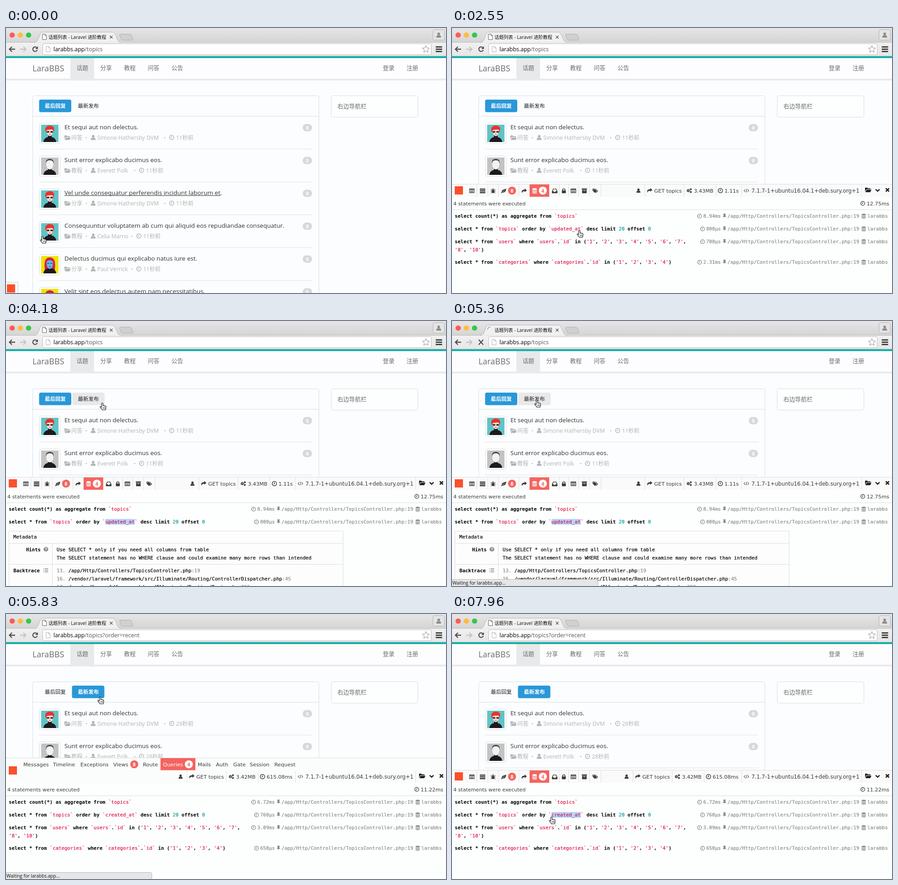
Animation, 964 px wide and 581 px high, one loop 8 s. Source, as an HTML page:

```html
<!DOCTYPE html>
<html lang="zh-CN">
<head>
<meta charset="utf-8">
<title>话题列表</title>
<style>
html, body { margin: 0; width: 100%; height: 100%; overflow: hidden; background: #fcfdfe; }
#stage { display: block; width: 964px; height: 581px; cursor: default; }
text { white-space: pre; font-family: 'Open Sans', 'Noto Sans CJK SC', 'Noto Sans CJK JP', 'Noto Sans CJK', sans-serif; }
.title { font-size: 13.5px; fill: #333; }
.meta { font-size: 12.2px; fill: #b4b4b4; }
.nav { font-size: 12.8px; fill: #6c6c6c; }
.brand { font-size: 18px; fill: #6c6c6c; }
.pill { font-size: 11.5px; fill: #222; }
.on { fill: #fff; font-weight: 700; }
.tab { font-size: 10.2px; fill: #111; }
.url { font-size: 12.45px; fill: #000; }
.path { fill: #555; }
.status { font-size: 10px; fill: #111; }
.bar { font: 11.35px 'DejaVu Sans', 'Noto Sans', sans-serif; fill: #3a3a3a; }
.wide { font-size: 11.7px; }
.note { font: 11.07px 'DejaVu Sans', 'Noto Sans', sans-serif; fill: #3a3a3a; }
.code { font: 10.67px 'DejaVu Sans Mono', 'Liberation Mono', monospace; fill: #000; stroke: #000; stroke-width: .2px; }
.sql { font-weight: 700; stroke: none; }
.str { font-weight: 400; fill: #d14; stroke: #d14; }
.num { font-weight: 400; fill: #099; stroke: #099; }
.dim { fill: #888; stroke: #888; }
.end { text-anchor: end; }
.badge { font: 700 11px 'Open Sans', sans-serif; text-anchor: middle; }
</style>
</head>
<body>
<svg id="stage" viewBox="0 0 964 581" xmlns="http://www.w3.org/2000/svg"></svg>
<script>
const LOOP = 8000, CHAR = 6.42, BORDER = '#d3e0e9', RED = '#f4645f', LOGO = '#f9502d';

// Helpers that return SVG markup
const text = (x, y, s, cls) => `<text x="${x}" y="${y}" class="${cls}">${s}</text>`;
const rect = (x, y, w, h, fill, rest = '') => `<rect x="${x}" y="${y}" width="${w}" height="${h}" fill="${fill}" ${rest}/>`;
const box = (x, y, w, h, fill, stroke, r = 0) => rect(x + .5, y + .5, w, h, fill, `stroke="${stroke}" rx="${r}"`);
const path = (d, fill = 'none', stroke = 'none', w = 1) => `<path d="${d}" fill="${fill}" stroke="${stroke}" stroke-width="${w}"/>`;
const dot = (x, y, r, fill) => `<circle cx="${x}" cy="${y}" r="${r}" fill="${fill}"/>`;
const group = (name, body) => `<g class="${name}">${body}</g>`;
const icon = (id, cx, cy, size = 12, color = '#3a3a3a') =>
  `<use href="#${id}" x="${cx - size / 2}" y="${cy - size / 2}" width="${size}" height="${size}" color="${color}"/>`;

// Icons on a 14 by 14 grid
const C = 'currentColor';
const line = (d, w = 1.6) => path(d, 'none', C, w);
const solid = d => `<path d="${d}" fill="${C}" fill-rule="evenodd"/>`;
const gear = (x, y, r) => `<circle cx="${x}" cy="${y}" r="${r}" fill="none" stroke="${C}" stroke-width="2"/>` +
  `<circle cx="${x}" cy="${y}" r="${r + 1.3}" fill="none" stroke="${C}" stroke-width="1.3" stroke-dasharray="1.4 1.6"/>`;
const icons = {
  folder: solid('M0 2h5l1 1.5h6V5.6H3L0 10.5z M3.5 6.4H14L11.4 12H.5z'),
  user: solid('M7 .5a3.4 3.6 0 1 1 0 7.2 3.4 3.6 0 1 1 0-7.2z M.8 13.5c0-4.5 2-6 3.6-6 1.6 1 3.6 1 5.2 0 1.6 0 3.6 1.5 3.6 6z'),
  clock: `<circle cx="7" cy="7" r="5.6" fill="none" stroke="${C}" stroke-width="1.7"/>` + line('M7.2 3.5V7.5H4.5', 1.3),
  list: line('M.8 2.3h12.4v9.6H.8z', 1.4) + solid('M.8 2h12.4v2.4H.8z') + line('M2.5 6.4h9M2.5 8.4h9M2.5 10.3h9', 1),
  tasks: solid('M0 1.2h14v3H0z M0 5.6h14v3H0z M0 10h14v3H0z'),
  bug: solid('M7 1.2c2 0 2.6 1.4 2.6 2.6H4.4C4.4 2.6 5 1.2 7 1.2z M3.8 4.8h6.4v4.2c0 5.2-6.4 5.2-6.4 0z') +
    line('M1 3l3 2.5M13 3l-3 2.5M.5 8h3.5M13.5 8H10M1.5 13l3-3M12.5 13l-3-3', 1.2),
  leaf: solid('M13.5 1C13.5 9 10 12 5 11L1.5 13.2.5 12 2.5 9.8C1.5 3.5 9 4.5 13.5 1z') + path('M4 9.5C6 7.5 8 7 10 6.5', 'none', '#fff', .9),
  share: solid('M8.5 1L14 5.8 8.5 10.5V7.8C4 7.6 2 9 2.3 13-1 8 1 4 8.5 4z'),
  db: solid('M1 2.5c0-2.8 12-2.8 12 0v1c0 1.8-12 1.8-12 0z M1 5.3c2 1.3 10 1.3 12 0v1.4c0 1.8-12 1.8-12 0z M1 8.3c2 1.3 10 1.3 12 0v1.4c0 1.8-12 1.8-12 0z M1 11.2c2 1.3 10 1.3 12 0v.8c0 2.4-12 2.4-12 0z'),
  inbox: solid('M3 1.5h8L14 8v5H0V8z M4 3L2 8h2.5l1 2h3l1-2H12L10 3z'),
  lock: solid('M2 6h1V4.5c0-5 8-5 8 0V6h1v7H2z M5 6h4V4.5c0-2.5-4-2.5-4 0z'),
  archive: solid('M.5 1h13v3.2H.5z M1.2 5h11.6v8H1.2z M5 6.3h4v1.2H5z'),
  tags: solid('M0 1.5h5L11 7.5 6.3 12.5 0 6.5z M2.5 3a1 1 0 1 0 .1 0z M6.5 1.5h1.5L14 7.5 9.3 12.5 8.5 11.7 12 7.5z'),
  cogs: gear(4.8, 7, 2.3) + gear(11.4, 3.6, 1) + gear(11.4, 10.6, 1),
  code: line('M4 3.5L1 7l3 3.5M10 3.5L13 7l-3 3.5M8 2.5L6 11.5', 1.2),
  pin: solid('M3.5 0h7v1.5h-1v4L12 9H7.7L7 14 6.3 9H2L4.5 5.5v-4h-1z'),
  down: line('M1.5 4.5L7 9.8 12.5 4.5', 3.2),
  close: line('M2 2L12 12M12 2L2 12', 3.8),
  ul: line('M0 2.5h2M4 2.5h10M0 7h2M4 7h10M0 11.5h2M4 11.5h10', 1.7),
  help: dot(7, 7, 6.5, C) + path('M4.9 5.5c0-2.7 4.4-2.5 4.2 0C9 6.8 7 6.8 7 8.6M7 9.8v1.6', 'none', '#fff', 1.6),
  page: path('M2.5.5h6l3.5 3.5v9.5h-9.5z M8.5.5V4H12', '#fff', C)
};
const defs = '<defs>' + Object.entries(icons).map(([id, d]) => `<symbol id="${id}" viewBox="0 0 14 14">${d}</symbol>`).join('') +
  `<linearGradient id="strip" x2="0" y2="1"><stop stop-color="#e6e6e6"/><stop offset="1" stop-color="#d4d4d4"/></linearGradient>
  <linearGradient id="tool" x2="0" y2="1"><stop stop-color="#f1f1f1"/><stop offset="1" stop-color="#e6e6e6"/></linearGradient></defs>`;

// Browser window
function browser() {
  const lights = ['#fc5b57', '#fdbc40', '#34c84a'].map((c, i) => dot(13.5 + 18 * i, 15.5, 5.8, c)).join('');
  return rect(0, 0, 964, 32, 'url(#strip)') + rect(0, 31, 964, 31, 'url(#tool)') + rect(0, 31, 964, 1, '#bcbcbc') + rect(0, 61, 964, 1, '#b8bcbc') + lights +
    path('M62 32C68 31 70 27 73 18 76 10 77 9 81 9H232C236 9 238 11 241 18 245 28 246 31 252 32z', '#f1f1f1', '#b4b4b4') +
    rect(64, 31.5, 187, 1.5, '#f0f0f0') +
    path('M250 13.5H271Q274 13.5 275 16L278 24Q278.5 26.5 276 26.5H256Q253 26.5 252 24L249 16Q248.5 13.5 250 13.5z', '#d0d0d0', '#b0b0b0') +
    group('idle', icon('page', 84, 19.5, 13, '#555')) +
    group('busy', '<path id="spin" d="M78 19A6 6 0 0 1 84 13" fill="none" stroke="#9a9a9a" stroke-width="1.6"/>') +
    text(93, 23.5, '话题列表 - Laravel 进阶教程', 'tab') + path('M227.5 17l6 6m0-6l-6 6', 'none', '#555', 1.3) +
    box(935, 3, 25, 23, '#e4e4e4', '#b4b4b4', 3) + icon('user', 948, 15.5, 12, '#8a8a8a') +
    path('M20 46.5H8M13 41L7.5 46.5 13 52', 'none', '#505050', 2.4) +
    path('M31 46.5H43M38 41L43.5 46.5 38 52', 'none', '#c4c4c4', 2.4) +
    group('idle', path('M67.5 43A5 5 0 1 0 68.5 48', 'none', '#505050', 2.2) + path('M70 40v6h-6z', '#505050')) +
    group('busy', path('M58.5 41l10 11m0-11l-10 11', 'none', '#505050', 2.4)) +
    box(80, 34, 851, 24, '#fff', '#bdbdbd', 2) + icon('page', 92, 46.5, 13, '#aaa') +
    text(104, 51, 'larabbs.app<tspan class="path">/topics<tspan class="new">?order=recent</tspan></tspan>', 'url') +
    path('M920 38.5l2.2 5.2 5.6.5-4.3 3.7 1.3 5.5-4.8-2.9-4.8 2.9 1.3-5.5-4.3-3.7 5.6-.5z', '#fff', '#8c8c8c') +
    path('M941.5 41.5h14M941.5 46.5h14M941.5 51.5h14', 'none', '#444', 2.8);
}

// Avatars: 38 by 38
const body = path('M5 38C6 31 9 29 15 27V22H23V27C29 29 32 31 33 38z', '#1b1a1e');
const faces = {
  teal: rect(0, 0, 38, 38, '#62c3c6') + body + path('M12 11C12 20 15 25 19 25S26 20 26 11z', '#f7ddd3') +
    path('M11 17C6 9 11 2 19 2S31 7 27 17C27 13 26 11 23 10 18 11 14 11 12 12z', '#ee3129') +
    rect(12, 14, 6, 3.5, '#4a2a34', 'rx="1.5"') + rect(20, 14, 6, 3.5, '#4a2a34', 'rx="1.5"') + rect(17.5, 20.5, 3, 1.4, '#d8232c', 'rx=".7"'),
  grey: rect(0, 0, 38, 38, '#c3c3c3') + body + path('M11 11C11 20 14 26 19 26S27 20 27 11C26 3 12 3 11 11z', '#f3f3f3') +
    path('M11 14C9 6 14 3 19 3S29 6 27 14C27 9 25 6 19 6S11 9 11 14z', '#444'),
  gold: rect(0, 0, 38, 38, '#f1e200') + path('M8 30C6 12 9 3 19 3S32 12 30 30z', '#d51f4b') + body +
    path('M12 13C12 25 15 28 19 28S26 25 26 13C23 8 15 8 12 13z', '#62b8ea') +
    rect(13.5, 15, 4, 1.6, '#243a78') + rect(20.5, 15, 4, 1.6, '#243a78') + rect(17, 22.5, 4, 1.6, '#d51f4b')
};

// Forum page
const topics = [
  ['Et sequi aut non delectus.', '问答', 'Simone Hathersby DVM', 339, 'teal'],
  ['Sunt error explicabo ducimus eos.', '教程', 'Everett Polk', 273, 'grey'],
  ['Vel unde consequatur perferendis incidunt laborum et.', '分享', 'Simone Hathersby DVM', 339, 'teal'],
  ['Consequuntur voluptatem ab cum qui aliquid eos repudiandae consequatur.', '教程', 'Celia Marno', 267, 'teal'],
  ['Delectus ducimus qui explicabo natus iure est.', '分享', 'Paul Verrick', 267, 'gold'],
  ['Velit sint eos delectus autem nam necessitatibus.', '分享', 'Paul Verrick', 267, 'gold']
];
function topic([title, kind, name, end, face], i) {
  const y = 72 * i;
  return box(73, y + 208, 45, 45, '#fff', '#ddd', 4) + `<g transform="translate(77 ${y + 212})">${faces[face]}</g>` +
    text(128, y + 222, title, 'title') + (i == 2 ? group('under', rect(128, y + 223, 342, 1, '#333')) : '') +
    icon('folder', 135, y + 240.5, 14, '#b4b4b4') + text(143, y + 245, kind, 'meta') + dot(176, y + 240.5, 1.2, '#b4b4b4') +
    icon('user', 191, y + 240, 12, '#b4b4b4') + text(200, y + 245, name, 'meta') + dot(end + 9, y + 240.5, 1.2, '#b4b4b4') +
    icon('clock', end + 24, y + 240, 12, '#b4b4b4') +
    group('old', text(end + 33.5, y + 245, '11秒前', 'meta')) + group('new', text(end + 33.5, y + 245, '28秒前', 'meta')) +
    rect(650, y + 210.5, 20.5, 16, '#d8d8d8', 'rx="8"') + `<text x="660.2" y="${y + 222.6}" class="badge" fill="#fff">0</text>` +
    rect(72, y + 265, 599, 1, '#dfe1e3');
}
function forum() {
  const nav = [['话题', 154.5], ['分享', 206.5], ['教程', 258.5], ['问答', 310.5], ['公告', 362.5], ['登录', 825.5], ['注册', 877.5]];
  const tabs = (a, b) => text(85, 174.8, '最后回复', 'pill ' + a) + text(157.5, 174.8, '最新发布', 'pill ' + b);
  return rect(0, 62, 964, 519, '#fcfdfe') + rect(0, 110, 964, 5, '#e9eaeb') + rect(0, 66, 964, 45, '#fdfdff') + rect(0, 62, 964, 4, '#13b1ab') +
    rect(141, 66, 52, 45, '#e8e9ea') + text(58, 94.5, 'LaraBBS', 'brand') + nav.map(([s, x]) => text(x, 92.3, s, 'nav')).join('') +
    box(58, 148, 627, 500, 'none', BORDER, 4) + rect(59, 193, 626, 1, BORDER) +
    box(712, 148, 190, 47, '#fdfefe', BORDER, 4) + text(726, 176, '右边导航栏', 'nav') +
    group('hover', rect(145, 157, 71, 27.5, '#e9e9e9', 'rx="4"')) +
    group('old', rect(72.5, 157, 70.5, 27.5, '#2898d8', 'rx="4"') + tabs('on', '')) +
    group('new', rect(144.5, 157, 71, 27.5, '#2898d8', 'rx="4"') + tabs('', 'on')) +
    topics.map(topic).join('') +
    group('mini', box(-2, 557, 28, 30, '#fbfbfb', '#ccc') + rect(2, 562, 18, 18, LOGO));
}

// Debug bar
const count = (x, y, n, fill, color) => dot(x, y, 8.8, fill) + `<text x="${x}" y="${y + 4}" class="badge" fill="${color}">${n}</text>`;
const rules = xs => xs.map(x => rect(x, 343, 1, 27, '#e0e0e0')).join('');
function sql(y, s) {
  const html = s.replace(/`[^`]*`|'[^']*'|\b\d+\b/g, m => `<tspan class="${/\d/.test(m[0]) ? 'num' : 'str'}">${m}</tspan>`);
  return text(6, y, html, 'code sql');
}
const origin = (y, time) => icon('clock', 589 - time.length * CHAR - 8, y - 3.5, 11, '#888') + text(589, y, time, 'code dim end') +
  icon('pin', 597, y - 3.5, 11, '#888') + text(603.5, y, '/app/Http/Controllers/TopicsController.php:19', 'code dim') +
  icon('db', 902, y - 3.5, 11, '#888') + text(910, y, 'larabbs', 'code dim');
function info(shift, memory, time, total, spans) {
  const x = s => s + shift;
  return icon('user', x(408.5), 356.5, 10) + rules([x(422), x(508), shift ? 552 : 578]) +
    icon('share', x(433), 356, 12) + text(x(443), 360.5, 'GET topics', 'bar') +
    icon('cogs', x(519.5), 356.5, 12) + text(x(530), 360.5, memory, 'bar') +
    icon('clock', shift ? 562 : 588, 356.5, 12) + text(shift ? 571 : 597, 360.5, time, 'bar') +
    text(958, 388.5, total, 'bar end') + icon('clock', 900, 384.5, 11) +
    origin(416, spans[0]) + origin(444, spans[1]) + group('rest', origin(472, spans[2]) + origin(517, spans[3]));
}
function strip() {
  const tools = [['list', 43.5], ['tasks', 67], ['bug', 90], ['leaf', 113], ['share', 158], ['inbox', 225], ['lock', 245], ['list', 266], ['archive', 290], ['tags', 314]];
  return rect(0, 342, 964, 28, '#fafafa') + rect(0, 342, 964, 1, '#ddd') + rect(6, 347, 18, 18, LOGO) +
    rules([54, 78, 101, 146, 235, 255, 277, 301, 326]) + tools.map(([id, x]) => icon(id, x, 357, 12)).join('') +
    count(131.5, 356.5, 8, RED, '#fff') + rect(170, 343, 43, 27, RED) + icon('db', 181, 357, 12, '#fff') + count(199, 356.5, 4, '#fff', RED);
}
function labels() {
  const names = [['Messages', 38], ['Timeline', 103], ['Exceptions', 163], ['Views', 235], ['Route', 300], ['Mails', 420], ['Auth', 460], ['Gate', 498], ['Session', 534], ['Request', 588]];
  return rect(0, 315, 964, 55, '#fbfcfc') + rect(0, 315, 964, 1, '#ddd') + rect(6, 334, 18, 18, LOGO) +
    names.map(([s, x]) => text(x, 333.5, s, 'bar')).join('') + count(281, 329.5, 8, RED, '#fff') +
    rect(338.5, 316, 76.5, 26.5, RED) + `<text x="344" y="333.5" class="bar" style="fill:#fff">Queries</text>` + count(400.5, 329.5, 4, '#fff', RED);
}
function metadata() {
  const trace = [['13', '/app/Http/Controllers/TopicsController.php', 19], ['16', '/vendor/laravel/framework/src/Illuminate/Routing/ControllerDispatcher.php', 45], ['17', '/vendor/laravel/framework/src/Illuminate/Routing/Route.php', 212]];
  return box(6, 460, 732, 200, '#fdfdfd', '#ddd') + rect(7, 487, 731, 1, '#ddd') + rect(7, 533, 731, 1, '#ddd') + rect(101, 487, 1, 100, '#ddd') +
    text(16, 476.5, 'Metadata', 'code') + text(76, 504.5, 'Hints', 'code sql end') + icon('help', 87.5, 500.5, 11, '#888') +
    text(111, 504.5, 'Use SELECT * only if you need all columns from table', 'code') +
    text(111, 522.5, 'The SELECT statement has no WHERE clause and could examine many more rows than intended', 'code') +
    text(74, 550.5, 'Backtrace', 'code sql end') + icon('ul', 87, 546.5, 11, '#888') +
    trace.map(([n, file, at], i) => text(111, 550.5 + 18 * i, `<tspan class="dim">${n}. </tspan>${file}<tspan class="dim">:${at}</tspan>`, 'code')).join('');
}
function debugBar() {
  const order = col => sql(443.5, `select * from \`topics\` order by \`${col}\` desc limit 20 offset 0`);
  return rect(0, 370, 964, 211, '#fdfefe') + group('strip', strip()) + group('labels', labels()) +
    rules([634, 897]) + icon('code', 645, 356.5, 12) + text(656, 360.5, '7.1.7-1+ubuntu16.04.1+deb.sury.org+1', 'bar wide') +
    icon('folder', 912, 355, 14, '#222') + icon('down', 932.5, 355.5, 11, '#222') + icon('close', 954, 355, 10, '#222') +
    text(3, 388.5, '4 statements were executed', 'note') + rect(0, 398, 964, 1, '#ddd') +
    '<rect id="sel" y="434" height="12.5" fill="#b4d5fe"/>' + sql(415.5, 'select count(*) as aggregate from `topics`') +
    group('old', order('updated_at')) + group('new', order('created_at')) +
    group('rest', sql(471.5, "select * from `users` where `users`.`id` in ('1', '2', '3', '4', '5', '6', '7',") + sql(489.5, "'8', '10')") +
      sql(516.5, "select * from `categories` where `categories`.`id` in ('1', '2', '3', '4')")) +
    group('old', info(0, '3.43MB', '1.11s', '12.75ms', ['8.94ms', '800µs', '700µs', '2.31ms'])) +
    group('new', info(-26, '3.42MB', '615.08ms', '11.22ms', ['6.72ms', '760µs', '3.09ms', '650µs'])) +
    group('detail', metadata());
}

const hand = path('M4 10V2.2a1.5 1.5 0 0 1 3 0V7c.5-1 2.2-.9 2.5.2.6-.8 2-.6 2.3.4.7-.5 1.7-.1 1.7.9V11c0 2-1 3-1 5H5.5C4.5 13.5 1.5 11.5.7 9.6c-.4-1.2 1-1.8 1.9-.9z', '#fff', '#111', 1.1) +
  path('M7.2 10v3.5M9.2 10v3.5M11.2 10v3.5', 'none', '#111', .8);
const pointer = '<g id="pointer">' +
  group('arrow', path('M0 0V12.5L3 9.8 5 14.3 7 13.4 5 9H9z', '#111', '#fff', .8)) +
  group('hand', `<g transform="translate(-5.5 -1)">${hand}</g>`) + '</g>';
const stage = document.getElementById('stage');
stage.innerHTML = defs + forum() + group('debug', debugBar()) +
  group('status', path('M-1 566.5H316Q319.5 566.5 319.5 570V582H-1z', '#e6e6e6', '#b8b8b8') + text(1, 577.5, 'Waiting for larabbs.app...', 'status')) +
  browser() + pointer;

// Pointer legs: start, end, steps, x, y; each leg begins where the last one stopped
const legs = [
  [150, 630, 4, 9, 567], [1220, 1960, 6, 207, 430], [2100, 2550, 4, 279, 444], [2850, 3730, 7, 219, 444],
  [4180, 4180, 1, 211, 180], [4330, 4470, 2, 186, 174], [5650, 5830, 2, 206, 182],
  [5990, 6470, 4, 283, 444], [6920, 7510, 5, 222, 444], [7810, 7960, 2, 218, 445]
];
function pointerAt(t) {
  let x = 80, y = 457;
  for (const [from, to, n, ex, ey] of legs) {
    if (t < from) break;
    const gap = n > 1 ? (to - from) / (n - 1) : 1;
    const p = Math.min(1, (Math.floor((t - from) / gap + .001) + 1) / n);
    x += (ex - x) * p;
    y += (ey - y) * p;
  }
  return [x, y];
}

const parts = {};
for (const name of ['old', 'new', 'rest', 'detail', 'strip', 'labels', 'debug', 'status', 'idle', 'busy', 'mini', 'under', 'hover', 'arrow', 'hand'])
  parts[name] = stage.querySelectorAll('.' + name);
const show = (name, on) => parts[name].forEach(e => { e.style.display = on ? '' : 'none'; });
const byId = id => document.getElementById(id);
const sel = byId('sel'), spin = byId('spin'), cursor = byId('pointer');

function draw(t) {
  const between = (a, b) => t >= a && t < b;
  const open = t >= 930, fresh = t >= 5650, busy = between(4770, 5830);
  const wide = between(5650, 5990), detail = between(4030, 5650);
  const [x, y] = pointerAt(t);
  const onTabs = y > 157 && y < 187 && x > 73 && x < 216;
  const hot = onTabs || (open ? y > 400 && y < 525 : (x < 27 && y > 557) || (x > 73 && y < 470));
  show('old', !fresh); show('new', fresh);
  show('debug', open); show('mini', !open);
  show('labels', wide); show('strip', !wide);
  show('detail', detail); show('rest', !detail);
  show('busy', busy); show('idle', !busy);
  show('status', between(4770, 5990));
  show('under', t < 150);
  show('hover', onTabs && x > 145 && !fresh);
  show('hand', hot); show('arrow', !hot);
  cursor.setAttribute('transform', `translate(${x.toFixed(1)} ${y.toFixed(1)})`);

  // Text is selected by whole characters, from right to left
  const left = between(3730, 5650) ? 218 : 218 + CHAR * Math.max(0, Math.min(10, Math.round((x - 218) / CHAR)));
  const marked = between(2850, 5650) || t >= 6920;
  sel.setAttribute('x', left);
  sel.setAttribute('width', marked ? Math.max(0, 282.2 - left) : 0);
  spin.setAttribute('transform', `rotate(${-45 * (Math.floor((t - 4770) / 147) - 4)} 84 19)`);
}

const start = performance.now();
(function frame() {
  draw((performance.now() - start) % LOOP);
  requestAnimationFrame(frame);
})();
</script>
</body>
</html>
```
